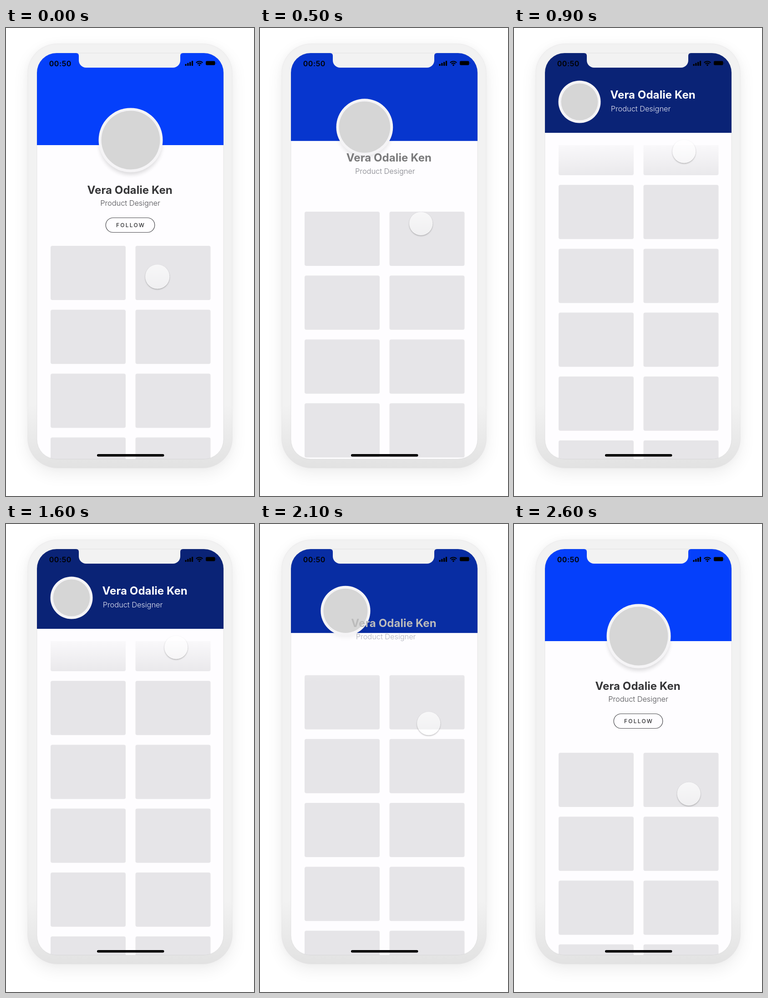
An HTML page for the animation above (2900 ms loop, 545 by 1027 pixels).

```html
<!DOCTYPE html>
<html lang="en">
<head>
<meta charset="utf-8">
<title>Collapsing profile header</title>
<style>
  html, body { margin: 0; width: 100%; height: 100%; overflow: hidden; background: #fff; }
  #stage { --p: 0; position: absolute; left: 0; top: 0; width: 545px; height: 1027px; overflow: hidden; }
  svg { position: absolute; left: 0; top: 0; }
  text { font-family: Inter, Roboto, sans-serif; text-anchor: middle; }
  .phone {
    position: absolute; left: 47px; top: 34px; width: 451px; height: 932px; border-radius: 66px;
    background: linear-gradient(#f2f2f2 85%, #e2e2e2);
    box-shadow: 0 12px 36px rgba(0, 0, 0, .07), 0 0 18px rgba(0, 0, 0, .025), inset 0 0 3px #e6e4e6;
  }
  #header {
    fill: color-mix(in srgb, #0a2376 calc(var(--p) * 100%), #0540fb);
    transform: translateY(calc(var(--p) * -27px));
  }
  #fade { opacity: var(--p); transform: translateY(calc(var(--p) * -27px)); }
  #avatar { transform: translate(calc(274px - 130px * var(--p)), calc(246px - 84px * var(--p))); }
  #rim { fill: #f5f4f6; r: calc(70.5px - 24px * var(--p)); }
  #face { fill: #d6d6d6; r: calc(64.5px - 24px * var(--p)); }
  #shade { r: calc(69px - 24px * var(--p)); opacity: calc(.13 * (1 - var(--p))); }
  #name {
    font-size: 24px; font-weight: 700; letter-spacing: .1px;
    fill: color-mix(in srgb, #fff calc(var(--p) * 100%), #353537);
    transform: translate(calc(33px * var(--p)), calc(-209px * var(--p)));
  }
  #role {
    font-size: 16.5px; font-weight: 300; letter-spacing: -.1px;
    fill: color-mix(in srgb, #e2e5f2 calc(var(--p) * 100%), #505054);
    transform: translate(calc(5.5px * var(--p)), calc(-206.5px * var(--p)));
  }
  #follow { opacity: calc(1 - 4 * var(--p)); transform: translateY(calc(-209px * var(--p))); }
  #touch {
    position: absolute; left: 0; top: 0; border-radius: 50%;
    background: linear-gradient(rgba(255, 255, 255, .7), rgba(255, 255, 255, .4));
    box-shadow: 0 1.5px 3px rgba(0, 0, 0, .27), inset 0 0 2px rgba(255, 255, 255, .8);
  }
</style>
</head>
<body>
<div id="stage">
  <div class="phone"></div>
  <svg width="545" height="1027" viewBox="0 0 545 1027">
    <defs>
      <clipPath id="screen"><rect x="68" y="55" width="410" height="891" rx="43"/></clipPath>
      <linearGradient id="veil" x1="0" y1="0" x2="0" y2="1">
        <stop offset="0" stop-color="#fefdff"/>
        <stop offset=".25" stop-color="#fefdff"/>
        <stop offset=".25" stop-color="#fefdff" stop-opacity=".8"/>
        <stop offset="1" stop-color="#fefdff" stop-opacity="0"/>
      </linearGradient>
      <filter id="blur" x="-20%" y="-20%" width="140%" height="140%"><feGaussianBlur stdDeviation="4"/></filter>
    </defs>
    <g clip-path="url(#screen)">
      <rect x="68" y="55" width="410" height="891" fill="#fefdff"/>
      <g id="cards" fill="#e6e5e8"></g>
      <rect id="fade" x="68" y="257" width="410" height="108" fill="url(#veil)"/>
      <rect id="header" x="68" y="0" width="410" height="257"/>
      <g id="follow">
        <rect x="219.2" y="416.5" width="107.6" height="32" rx="16" fill="none" stroke="#4a4a4e" stroke-width="1.2"/>
        <text x="274" y="437" font-size="12" font-weight="500" letter-spacing="2.2" fill="#2c2c2f">FOLLOW</text>
      </g>
      <g id="avatar">
        <circle id="shade" cy="7" filter="url(#blur)"/>
        <circle id="rim"/>
        <circle id="face"/>
      </g>
      <text id="name" x="272.2" y="364.3">Vera Odalie Ken</text>
      <text id="role" x="273" y="389.7">Product Designer</text>
      <text x="119.3" y="84" font-size="16" font-weight="600" letter-spacing=".5">00:50</text>
      <g id="bars"></g>
      <g fill="none" stroke="#000" stroke-width="2.2">
        <path d="M417.9 76.2a10 10 0 0 1 14.2 0M420.7 79a6 6 0 0 1 8.6 0"/>
        <circle cx="425" cy="81.4" r=".7"/>
      </g>
      <rect x="439" y="72.5" width="20.5" height="9" rx="2.3"/>
      <path d="M461 75.2q1.6 1.8 0 3.6z"/>
      <path fill="#f2f2f2" d="M154 54h235v1q-6 0-6 6v10a16 16 0 0 1-16 16h-191a16 16 0 0 1-16-16v-10q0-6-6-6z"/>
      <rect x="200" y="935" width="147.5" height="5.4" rx="2.7"/>
    </g>
    <rect x="68" y="55" width="410" height="891" rx="43" fill="none" stroke="#777" stroke-opacity=".22" stroke-width=".6"/>
  </svg>
  <div id="touch"></div>
</div>
<script>
const LOOP = 2900, STEP = 100, GRID_TOP = 478, COLLAPSE = 221;
const $ = id => document.getElementById(id);
const stage = $('stage'), cards = $('cards'), touch = $('touch');

const rect = (x, y, w, h, r) => `<rect x="${x}" y="${y}" width="${w}" height="${h}" rx="${r}"/>`;
let grid = '', bars = '';
for (let row = 0; row < 6; row++)
  for (const x of [98, 284.5]) grid += rect(x, row * 140.2, 165, 119, 4);
for (let i = 0; i < 4; i++) bars += rect(393.5 + i * 4.8, 79 - i * 2.3, 3.2, 4 + i * 2.3, .8);
cards.innerHTML = grid;
$('bars').innerHTML = bars;

// time, touch x, touch y, top of the card grid
const keys = [
  [0, 332.5, 545.5, 478], [100, 333, 541, 477], [200, 335, 525, 469], [300, 339, 500, 454],
  [400, 346, 467, 432], [500, 353.5, 429, 403], [600, 360.5, 374, 361], [700, 366.5, 320.5, 318],
  [800, 372, 283, 220], [900, 373.5, 270.5, 204], [1800, 373.5, 270.5, 204], [1900, 373.5, 319, 211],
  [2200, 369, 497, 392], [2300, 372, 540, 450], [2400, 378, 570, 487], [2500, 382.5, 586, 499],
  [2600, 384, 592, 502], [LOOP, 384, 592, 502]
];

function pose(t) {
  const i = keys.findIndex(k => k[0] > t), a = keys[i - 1], b = keys[i];
  const u = (t - a[0]) / (b[0] - a[0]);
  return a.map((v, j) => v + (b[j] - v) * u);
}

function draw(now) {
  const t = Math.floor(now % LOOP / STEP) * STEP;
  const [, x, y, top] = pose(t);
  const p = Math.min(1, Math.max(0, (GRID_TOP - top) / COLLAPSE));
  const r = 26.3 - Math.min(1, t / 300);
  stage.style.setProperty('--p', p);
  cards.setAttribute('transform', `translate(0 ${top})`);
  touch.style.width = touch.style.height = 2 * r + 'px';
  touch.style.transform = `translate(${x - r}px, ${y - r}px)`;
}

const start = performance.now();
function tick() {
  draw(performance.now() - start);
  requestAnimationFrame(tick);
}
tick();
</script>
</body>
</html>
```
